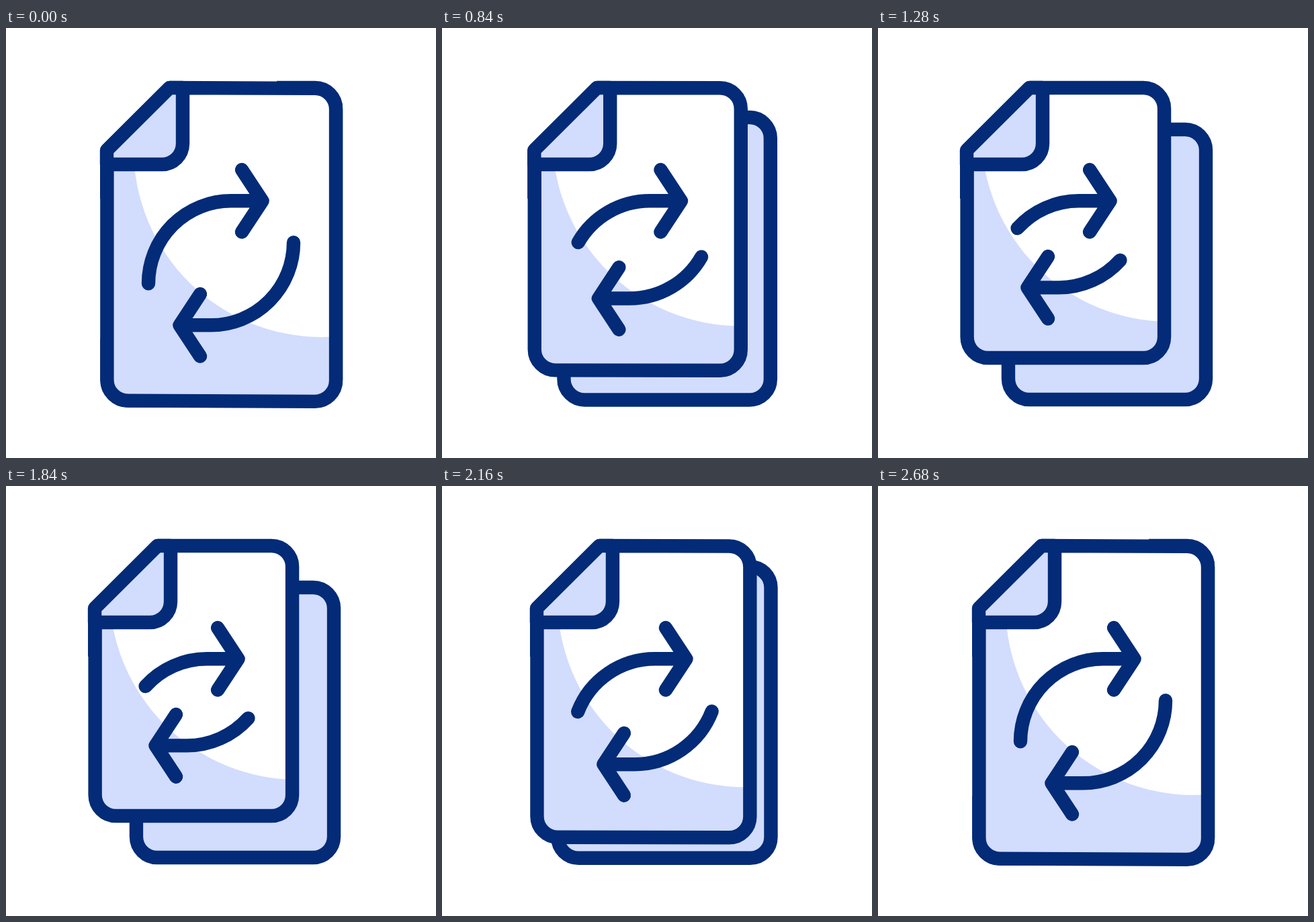
Recreate the animation shown at these times as an HTML page with a canvas. Size 640 by 640 pixels, loop 3000 ms.

```html
<!DOCTYPE html>
<html lang="en">
<head>
<meta charset="utf-8">
<title>Page sync</title>
<style>
  html, body { margin: 0; height: 100%; overflow: hidden; background: #fff; }
  canvas { display: block; width: 100vw; height: 100vh; }
</style>
</head>
<body>
<canvas id="stage" width="640" height="640"></canvas>
<script>
const ctx = document.getElementById('stage').getContext('2d');
const NAVY = '#032b77', PALE = '#d2dcfd', WHITE = '#fff';
const LOOP = 3000, STEP = 40, RADIUS = 31;

// Cubic Bezier easing with y handles at 0 and 1
function ease(x, x1, x2) {
  if (x <= 0) return 0;
  if (x >= 1) return 1;
  let lo = 0, hi = 1;
  for (let i = 0; i < 24; i++) {
    const s = (lo + hi) / 2, r = 1 - s;
    if (3 * r * r * s * x1 + 3 * r * s * s * x2 + s ** 3 < x) lo = s; else hi = s;
  }
  return lo * lo * (3 - 2 * lo);
}

// 0: pages stacked, 1: pages apart
const spread = t => ease((t - 490) / 825, 0.55, 0.05) - ease((t - 1812) / 850, 0.6, 0.16);

const mix = (a, b, k) => a + (b - a) * k;

function shape(path, fill) {
  if (fill) {
    ctx.fillStyle = fill;
    ctx.fill(path);
  }
  ctx.stroke(path);
}

function drawBackPage(k) {
  const left = mix(150.5, 194, k), right = mix(491, 488, k);
  const top = mix(89, 151, k), bottom = mix(554.5, 553, k);
  const p = new Path2D();
  p.moveTo(right - 88, top);
  p.arcTo(right, top, right, bottom, RADIUS);
  p.arcTo(right, bottom, left, bottom, RADIUS);
  p.arcTo(left, bottom, left, top, RADIUS);
  p.lineTo(left, bottom - 93);
  shape(p, PALE);
}

function drawFrontPage(k) {
  const left = mix(150.4, 132.6, k), right = mix(491, 426, k);
  const topRight = mix(90, 89, k);
  const bottomLeft = mix(554.5, 491, k), bottomRight = mix(556, 491, k);
  const shift = -18 * k;
  const p = new Path2D();
  p.moveTo(left, 182);
  p.lineTo(243.5 + shift, 89);
  p.arcTo(right, topRight, right, bottomRight, RADIUS);
  p.arcTo(right, bottomRight, left, bottomLeft, RADIUS);
  p.arcTo(left, bottomLeft, left, 182, RADIUS);
  p.closePath();

  ctx.save();
  ctx.clip(p);
  ctx.fillStyle = PALE;
  ctx.fillRect(0, 0, 640, 640);
  ctx.fillStyle = WHITE;
  ctx.beginPath();
  ctx.arc(mix(470, 434, k), mix(180, 157, k), 280, 0, 2 * Math.PI);
  ctx.fill();
  ctx.restore();
  shape(p);

  const fold = new Path2D();
  fold.moveTo(150 + shift, 182);
  fold.lineTo(243.5 + shift, 89);
  fold.lineTo(263 + shift, 89);
  fold.arcTo(263 + shift, 203, 150 + shift, 203, RADIUS);
  fold.lineTo(150 + shift, 203);
  fold.closePath();
  shape(fold, PALE);

  ctx.fillStyle = NAVY;
  ctx.fillRect(140 + shift, 182, 20, 72);
}

// Curved arrow around (x, y); dir -1 turns it by half a circle
function drawArrow(x, y, dir, k) {
  const sweep = mix(90, 48, k) * Math.PI / 180;
  ctx.save();
  ctx.translate(x, y);
  ctx.scale(dir, dir);
  ctx.lineCap = 'round';
  const p = new Path2D();
  p.arc(0, 0, 123, -Math.PI / 2 - sweep, -Math.PI / 2);
  p.lineTo(46, -123);
  p.moveTo(16, -169.3);
  p.lineTo(46.5, -123);
  p.lineTo(16, -76.7);
  shape(p);
  ctx.restore();
}

function draw(now) {
  const t = Math.floor(now % LOOP / STEP) * STEP;
  const k = spread(t);
  ctx.fillStyle = WHITE;
  ctx.fillRect(0, 0, 640, 640);
  ctx.strokeStyle = NAVY;
  ctx.lineWidth = 20.4;
  ctx.lineJoin = 'round';
  drawBackPage(k);
  drawFrontPage(k);
  drawArrow(335 - 36 * k, 380.3, 1, k);
  drawArrow(305 - 36 * k, 319.3 - 56 * k, -1, k);
}

function tick() {
  draw(performance.now());
  requestAnimationFrame(tick);
}
tick();
</script>
</body>
</html>
```
